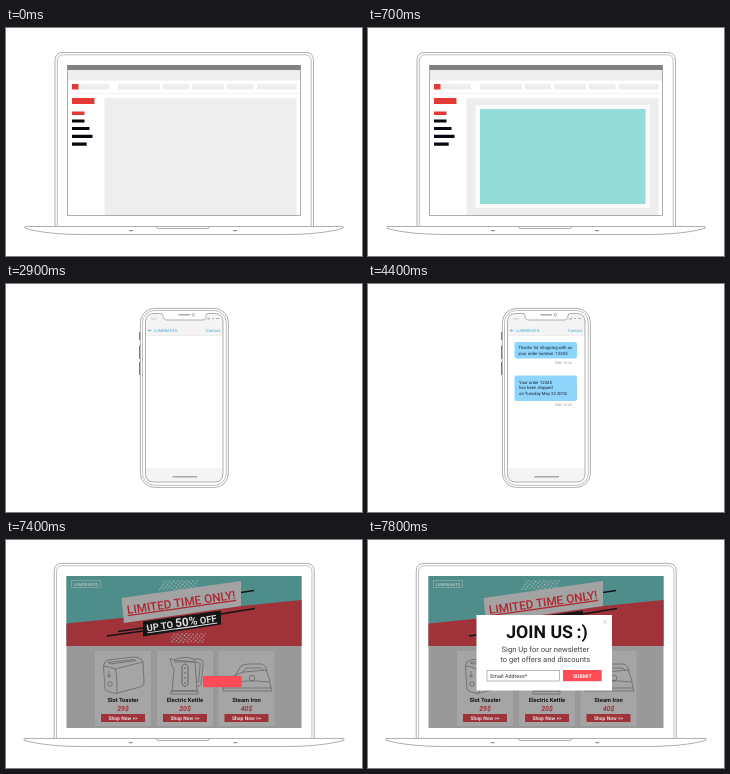
An HTML page for the animation above (9800 ms loop, 356x228 px).

```html
<!DOCTYPE html>
<html lang="en">
<head>
<meta charset="utf-8">
<title>Order journey</title>
<style>
  html, body { margin: 0; width: 100%; height: 100%; overflow: hidden; background: #fff; }
  svg { display: block; width: 100vw; height: 100vh; }
  text { font-family: Roboto, Arial, sans-serif; text-rendering: geometricPrecision; white-space: pre; }
  .mid { text-anchor: middle; }
  .end { text-anchor: end; }
  .b { font-weight: 700; }
  .m { font-weight: 500; }
  .u { text-decoration: underline; text-decoration-thickness: .6px; }
  .line { fill: none; stroke: #949494; stroke-width: .75; }
  .sketch { fill: none; stroke: #555; stroke-width: .6; stroke-linejoin: round; }
  .sms { font-size: 4.3px; fill: #123; }
  .stamp { font-size: 3.6px; fill: #999; }
  .bubble { fill: #8fd5fb; }
</style>
</head>
<body>
<svg viewBox="0 0 356 228">
  <defs>
    <pattern id="dots" width="3" height="3" patternUnits="userSpaceOnUse" patternTransform="rotate(38)">
      <circle cx="1.5" cy="1.5" r=".7" fill="#b5c4c3"/>
    </pattern>
  </defs>

  <g id="laptop">
    <g id="frame" class="line">
      <path d="M49 198V32.500Q49 24.500 57 24.500H299.500Q307.500 24.500 307.500 32.500V198"/>
      <path d="M51.300 198V33Q51.300 26.800 57.500 26.800H299Q305.200 26.800 305.200 33V198" stroke="#aaa"/>
      <path d="M19 198.500H337V200.300C322 204.600 302 206.500 277 206.500H79C54 206.500 34 204.600 19 200.300Z"/>
      <path d="M150 198.500Q150.500 200.500 153 200.500H201Q203.500 200.500 204 198.500"/>
      <path d="M123 202.600h4M227 202.600h4" stroke-width="1.200"/>
    </g>

    <g id="inbox">
      <path fill="#eee" d="M61.500 42H294.500V52.500H61.500ZM72 56h31v5.500H72ZM112 56h42v5.500h-42ZM157 56h26v5.500h-26ZM186 56h32v5.500h-32ZM221 56h26.500v5.500H221ZM251 56h39.500v5.500H251ZM61.500 65.300h233v.7h-233ZM98.500 70H290.500V187.500h-192Z"/>
      <path fill="#e53935" d="M66 56h6.500v5.500H66ZM66 70h22.500v6H66ZM66 83.500h12.500V87H66Z"/>
      <path fill="#080810" d="M66 91.500h12.500v3H66ZM66 99h17.500v3H66ZM66 106.700h20.500v3.200H66ZM66 114.500h14.700v3.200H66Z"/>
      <rect class="line" x="61.500" y="37.500" width="233" height="150"/>
      <rect x="61.500" y="37" width="233" height="5" fill="#808080"/>

      <g id="mail">
        <rect x="107.500" y="77" width="174.500" height="103" fill="#fff"/>
        <rect x="112" y="81" width="165.500" height="95" fill="#7cd9d1"/>
        <g id="letter" class="mid">
          <rect x="175.500" y="89.800" width="35.500" height="8.400" fill="none" stroke="#fff" stroke-width=".6"/>
          <text class="b" x="193.200" y="95.900" font-size="5" fill="#fff">LUMBRANTO</text>
          <rect x="124.500" y="109" width="143" height="58.500" fill="#4a9d9a"/>
          <rect x="122" y="107" width="143.500" height="58.500" fill="#fff"/>
          <text class="m" x="197" y="123" font-size="11" fill="#f93f4c">Thank For Your Order!</text>
          <text class="m" x="196.300" y="136.500" font-size="7.900" fill="#111">Your order is on its way</text>
          <g font-size="7.300" fill="#444">
            <text x="196" y="148.300">The invoice has been sent</text>
            <text x="196" y="156.800">to your email address</text>
          </g>
        </g>
      </g>
    </g>

    <g id="shop">
      <rect x="60.500" y="36" width="235" height="152" fill="#999"/>
      <rect x="60.500" y="36" width="235" height="70" fill="#4f8d8a"/>
      <path d="M60.500 83.500L295.500 60V106H60.500Z" fill="#a0323a"/>
      <path d="M157 40h36l-4 10h-36ZM167 93h34l-4 10h-34Z" fill="url(#dots)"/>
      <path d="M101 96L137 91M112 91.500L137 88M215 74L249 68.500M235 52.500L248 50.500" stroke="#151515" stroke-width="1.600"/>
      <path d="M115.500 58L235 41V66L118 83Z" fill="#a3a3a3"/>
      <path d="M137 81.500L215 70.500V84.500L137 96.500Z" fill="#151515"/>
      <rect x="65.500" y="40.300" width="29" height="7" fill="none" stroke="#a9bcbb" stroke-width=".5"/>
      <text class="mid b" x="80" y="45.500" font-size="4.100" fill="#a9bcbb">LUMBRANTO</text>
      <g class="mid">
        <text class="m u" transform="translate(175.800 66.500) rotate(-8)" font-size="11.800" fill="#b02631">LIMITED TIME ONLY!</text>
        <text class="b u" transform="translate(176 86.500) rotate(-8)" font-size="9.500" fill="#ddd">UP TO <tspan font-size="11.800">50%</tspan> OFF</text>
      </g>
      <g id="goods"></g>
      <g class="sketch">
        <path d="M97.500 126Q98 121 102 120L127 117Q136 117.500 137 122L138 143Q138 146 134 147L110 153.500Q101 152 99 149.500ZM97.500 126Q103 126.500 109 129Q111 131 111 153M109 129L137 122M102 122.500L127 119.500l3 1L105 124Z"/>
        <path d="M103 131V138M101 136h4"/><circle cx="104" cy="144" r="2.300"/>
        <path d="M168 120L164 118.500L166 126L168 129L166 151H191L189 122ZM168 120Q178 115 189 119.500V122H168M189 119H194Q197.500 120 197 126L195 144Q194 147 190.500 146M190 122.500H193Q194.500 123 194 127L192.500 142H190.500M165 151h27v3h-27Z"/>
        <path d="M176 126Q179 122 182 126V144Q179 149 176 144ZM179 127v2M179 132v2M179 137v2M179 142v2" stroke-width=".8"/>
        <path d="M217 148Q224 135 238 132L260 130Q264 138 265 148ZM217 148V151H266L265 148M229 136L235 126Q238 124 243 124H255Q260 125 261 131M236 133L240 128H255L257 130.500M222 144Q240 139 263 142"/>
        <circle cx="246" cy="138" r="2.800"/>
      </g>
    </g>

    <g id="popup">
      <rect x="108.500" y="75" width="135.500" height="75.500" fill="#fff"/>
      <path d="M235 79.800l4 4m0-4l-4 4" stroke="#aaa" stroke-width=".5"/>
      <g class="mid">
        <text class="b" x="179" y="98" font-size="17.700" fill="#111">JOIN US&#8201;:)</text>
        <text x="177.300" y="111.500" font-size="7.600" fill="#444">Sign Up for our newsletter</text>
        <text x="177.300" y="122" font-size="7.500" fill="#444">to get offers and discounts</text>
      </g>
      <rect x="119" y="130.500" width="72.500" height="10.500" fill="#fff" stroke="#888" stroke-width=".6"/>
      <text x="122.300" y="137.600" font-size="5.400" fill="#333">Email Address*</text>
    </g>
    <g id="submit">
      <rect x="195" y="130" width="38.700" height="11.200" fill="#ff4b55"/>
      <text id="label" class="mid b" x="214.300" y="137.500" font-size="5.100" fill="#fff">SUBMIT</text>
    </g>
  </g>

  <g id="phone">
    <path d="M133.500 48v8M133.500 61.500v13.500M133.500 78v13" stroke="#777" stroke-width="1"/>
    <g class="line">
      <rect x="134.400" y="24.400" width="88" height="179" rx="14"/>
      <rect x="136.500" y="26.500" width="83.800" height="174.800" rx="12" stroke="#aaa"/>
    </g>
    <path d="M139.500 51.500V38Q139.500 29.500 148 29.500H155Q157 29.500 157 31.500Q157 36 161 36H196Q200 36 200 31.500Q200 29.500 202 29.500H208.500Q217 29.500 217 38V51.500ZM139.500 185H217V189.500Q217 198 208.500 198H148Q139.500 198 139.500 189.500Z" fill="#f4f4f4"/>
    <path class="line" d="M155 29.500H148Q139.500 29.500 139.500 38V189.500Q139.500 198 148 198H208.500Q217 198 217 189.500V38Q217 29.500 208.500 29.500H202Q200 29.500 200 31.500Q200 36 196 36H161Q157 36 157 31.500Q157 29.500 155 29.500Z"/>
    <path d="M139.500 51.500H217M139.500 185H217" stroke="#e2e2e2" stroke-width=".5"/>
    <path d="M173 30.800H183.500M167 192.700H190.500" stroke="#aaa" stroke-width="1.500" stroke-linecap="round"/>
    <circle class="line" cx="187.300" cy="30.800" r="1.300"/>
    <text x="145" y="36" font-size="3.200" fill="#aaa">9:41</text>
    <path d="M201 35.500v-1M202.300 35.500v-1.500M203.600 35.500v-2M206 34.500h2M210 34.500h3.500" stroke="#aaa" stroke-width=".9"/>
    <g fill="#45a9d6">
      <path d="M145.800 46.500H142.300M143.800 45l-1.500 1.500l1.500 1.500" fill="none" stroke="#45a9d6" stroke-width=".6"/>
      <text x="148" y="48" font-size="4">LUMBRANTO</text>
      <text class="end" x="214.300" y="48" font-size="4.100">Contact</text>
    </g>
    <g id="sms1">
      <rect class="bubble" x="146.500" y="58" width="62.500" height="16.500" rx="2"/>
      <g class="sms"><text x="150.300" y="64.500">Thanks for shopping with us</text><text x="150.300" y="70.500">your order number  12345</text></g>
      <text class="stamp end" x="204" y="80">SMS 10:36</text>
    </g>
    <g id="sms2">
      <rect class="bubble" x="146.500" y="91.500" width="62.500" height="25.500" rx="2"/>
      <g class="sms"><text x="151" y="99.500">Your order 12345</text><text x="151" y="105.200">has been shipped</text><text x="151" y="111">on Tuesday May 22 2018.</text></g>
      <text class="stamp end" x="204" y="122">SMS 10:45</text>
    </g>
    <g id="sms3">
      <path d="M146.500 132.500H162.500M194 132.500H209" stroke="#ccc" stroke-width=".5"/>
      <text class="stamp mid" x="178.300" y="133.700">Thu, Jan 11, 2018</text>
      <rect class="bubble" x="146.500" y="138" width="62.500" height="25.500" rx="2"/>
      <g class="sms"><text x="152" y="146">Your order was delivered!</text><text x="152" y="151.900">We will be happy</text><text x="152" y="157.800">to serve you in the future!</text></g>
      <text class="stamp end" x="204" y="169">SMS 11:20</text>
    </g>
  </g>
</svg>
<script>
const LOOP = 9800;
const el = id => document.getElementById(id);
const fade = (id, alpha) => { el(id).style.opacity = alpha; };
const clamp = v => Math.max(0, Math.min(1, v));
// Whole 100 ms steps reached since `start`, counting the first as 1
const steps = (t, start) => Math.floor((t - start) / 100) + 1;

const goods = [[117, 'Slot Toaster', '29$'], [179, 'Electric Kettle', '20$'], [240.5, 'Steam Iron', '40$']];
el('goods').innerHTML = goods.map(([x, name, price]) => `
  <g class="mid b" transform="translate(${x})">
    <rect x="-28" y="111" width="56" height="75" fill="#a5a5a5"/>
    <text y="162.300" font-size="5.800" fill="#151515">${name}</text>
    <text y="170.500" font-size="7" font-style="italic" fill="#a0323a">${price}</text>
    <rect x="-22" y="174" width="44" height="8" fill="#a0323a"/>
    <text y="179.800" font-size="5" fill="#ddd">Shop Now &gt;&gt;</text>
  </g>`).join('');

function draw(t) {
  const onPhone = t >= 2900 && t < 7400;
  const inShop = t >= 7400;
  fade('laptop', +!onPhone);
  fade('phone', +onPhone);
  fade('inbox', +!inShop);
  fade('shop', +inShop);
  // The laptop stands slightly larger in the shop scene
  el('frame').setAttribute('transform', inShop ? 'translate(178 207) scale(1.006) translate(-178 -207)' : '');

  fade('mail', clamp(steps(t, 500) * .26));
  fade('letter', clamp((steps(t, 500) - 3) / 2));

  fade('sms1', clamp(steps(t, 3200) / 3));
  fade('sms2', +(t >= 4400));
  fade('sms3', +(t >= 5400));

  const k = clamp((steps(t, 7400) - 1) / 4);
  fade('popup', k);
  fade('label', k);
  fade('submit', +inShop);
  el('submit').setAttribute('transform', `translate(${2 * (1 - k)} ${6 * (1 - k)})`);
}

const start = performance.now();
function tick() {
  draw((performance.now() - start) % LOOP);
  requestAnimationFrame(tick);
}
tick();
</script>
</body>
</html>
```
